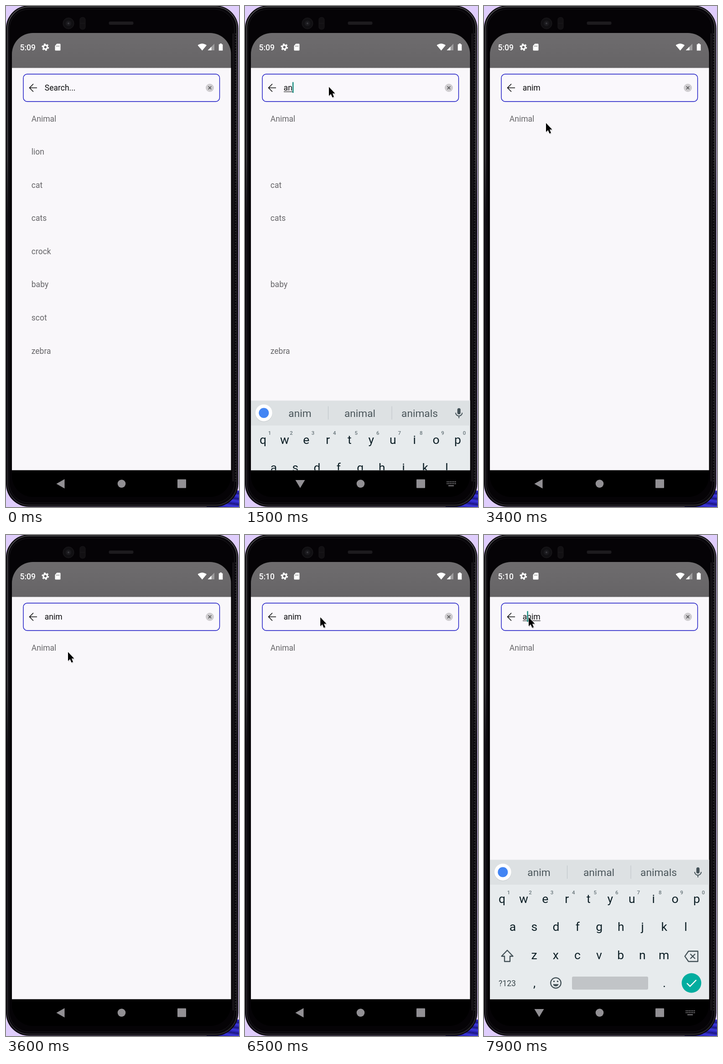
An HTML page that plays this animation: 511x1096 px, repeating every 8 s.

```html
<!DOCTYPE html>
<html lang="en">
<head>
<meta charset="utf-8">
<title>Search demo</title>
<style>
  html, body { margin: 0; width: 100%; height: 100%; overflow: hidden; background: #dfcdfc; }
  svg { display: block; width: 100%; height: 100%; }
  text { font-family: Roboto, sans-serif; font-size: 17.5px; white-space: pre; }
  .list { fill: #666568; }
  .mid { text-anchor: middle; }
  .key { font-size: 26.5px; fill: #0d1f26; }
  .hint { font-size: 11.5px; fill: #68757a; font-weight: 500; }
  .word { font-size: 22.7px; fill: #4b565b; }
  .line { fill: none; stroke: #435157; stroke-width: 2.3; stroke-linejoin: round; }
</style>
</head>
<body>
<svg viewBox="0 0 511 1096">
  <defs>
    <linearGradient id="rim" x2="0" y2="1">
      <stop offset="0" stop-color="#48474a"/>
      <stop offset=".3" stop-color="#4e4d50"/>
      <stop offset=".42" stop-color="#1d1b20"/>
      <stop offset="1" stop-color="#2d2b30"/>
    </linearGradient>
    <linearGradient id="bar" x2="0" y2="1">
      <stop offset="0" stop-color="#6e6c6e"/>
      <stop offset="1" stop-color="#666466"/>
    </linearGradient>
    <linearGradient id="blue" x2="0" y2="6" gradientUnits="userSpaceOnUse" spreadMethod="repeat" y1="0" x1="0" gradientTransform="rotate(8) scale(2)">
      <stop offset="0" stop-color="#18146f"/>
      <stop offset=".5" stop-color="#3c37e0"/>
      <stop offset="1" stop-color="#211b9c"/>
    </linearGradient>
    <clipPath id="screen"><rect x="13" y="59" width="480.5" height="1015" rx="46"/></clipPath>
    <clipPath id="app"><rect x="13" y="135" width="480.5" height="880.5"/></clipPath>
  </defs>

  <rect width="511" height="1096" fill="#dfcdfc"/>
  <rect x="440" y="1060" width="71" height="36" fill="url(#blue)"/>

  <!-- phone body -->
  <rect x="0" y="-1" width="509.5" height="1096.5" rx="50" fill="#08060a"/>
  <rect x="3.5" y="2" width="503" height="1090" rx="47" fill="none" stroke="url(#rim)" stroke-width="2"/>
  <rect x="7" y="7" width="494" height="1080" rx="44" fill="#050306" stroke="#1b191d"/>
  <path d="M498 60V1040" stroke="#2b292d" stroke-width="1.5"/>
  <path d="M503.5 60V1040" stroke="#242226" stroke-width="3" stroke-dasharray="3 3"/>
  <circle cx="137" cy="38" r="12" fill="#111013" stroke="#1d1b1e"/>
  <circle cx="137" cy="38" r="6" fill="#1b1a1e"/>
  <circle cx="137" cy="38" r="2" fill="#3a393e"/>
  <rect x="162" y="25" width="12" height="26" rx="5" fill="#121013" stroke="#1a181b"/>
  <path d="M163 38H173" stroke="#1d1b1e"/>
  <rect x="225.5" y="34" width="54" height="7" rx="3" fill="#1d1b1e"/>

  <g clip-path="url(#screen)">
    <rect x="13" y="59" width="481" height="1016"/>
    <rect x="13" y="59" width="481" height="77" fill="url(#bar)"/>
    <rect x="13" y="135.5" width="481" height="880" fill="#f9f7fa"/>
  </g>

  <!-- status bar -->
  <g fill="#fff">
    <text id="clock" x="30.5" y="96.5" font-weight="500"></text>
    <circle cx="86.3" cy="90" r="4.3" fill="none" stroke="#fff" stroke-width="3.2"/>
    <circle cx="86.3" cy="90" r="6.8" fill="none" stroke="#fff" stroke-width="2.4" stroke-dasharray="3.6 3.52"/>
    <path d="M111.5 82.5H118a1.5 1.5 0 0 1 1.5 1.5V96a1.5 1.5 0 0 1-1.5 1.5H109a1.5 1.5 0 0 1-1.5-1.5V87Z"/>
    <path d="M110.8 86.5v2.7M113.5 86.5v2.7M116.2 86.5v2.7" stroke="#777" stroke-width="1.2"/>
    <path d="M420.5 86Q430.3 78.5 440 86L430.3 97.5Z"/>
    <path d="M457 82.5V97H442.5Z" opacity=".35"/>
    <path d="M450.5 89V97H442.5Z"/>
    <path d="M469 82h4v1.7h2.3V97.5h-8.6V83.7H469Z"/>
  </g>

  <!-- search field -->
  <rect x="38" y="149" width="430.5" height="60" rx="8.5" fill="#faf8fc" stroke="#1715c4" stroke-width="1.4"/>
  <path d="M68 179H52.5M60 170.5L51.5 179L60 187.5" fill="none" stroke="#111" stroke-width="1.6"/>
  <circle cx="447" cy="179" r="9" fill="#cfcdd0"/>
  <path d="M443.7 175.7l6.6 6.6m0-6.6l-6.6 6.6" stroke="#505052" stroke-width="1.6"/>
  <text id="query" x="84.8" y="185" fill="#0c0c0e"></text>
  <rect id="underline" x="85" y="187" height="1.2" fill="#222"/>
  <rect id="caret" y="166.5" width="2.4" height="23.5" fill="#128a7d"/>

  <g id="list"></g>

  <!-- keyboard -->
  <g clip-path="url(#app)">
    <g id="keyboard">
      <rect x="13" y="710" width="481" height="2" fill="#eceaee"/>
      <rect x="13" y="711" width="481" height="305" fill="#e7ebed"/>
      <rect x="13" y="711" width="481" height="54" fill="#dde1e3"/>
      <circle cx="41.3" cy="738.5" r="18.8" fill="#c9ced1"/>
      <circle cx="41.3" cy="737.5" r="18.5" fill="#fff"/>
      <circle cx="41.3" cy="737.5" r="11" fill="#4285f4"/>
      <path d="M182.5 723V752M322 723V752" stroke="#bcc2c6"/>
      <rect x="465.7" y="727" width="7" height="13.5" rx="3.5" fill="#435157"/>
      <path class="line" d="M462 737a7.2 7.2 0 0 0 14.4 0M469.2 744.5V749" style="stroke-width:1.9"/>
      <g id="keys"></g>
      <path class="line" d="M51 908.5L63.5 921.5H57V933H45V921.5H38.5Z"/>
      <path class="line" d="M448.5 910.5H469V933H448.5L440.5 921.7Z"/>
      <path class="line" d="M452.5 916.5l10.5 10.5m0-10.5l-10.5 10.5"/>
      <text x="51" y="986.5" class="mid" style="fill:#3a474c">?123</text>
      <circle class="line" cx="157.5" cy="980" r="11.3"/>
      <circle cx="153.5" cy="976.5" r="1.8" fill="#435157"/>
      <circle cx="161.5" cy="976.5" r="1.8" fill="#435157"/>
      <path d="M151.5 982.5h12a6 5 0 0 1-12 0Z" fill="#435157"/>
      <rect x="193" y="966" width="167" height="28.5" rx="3" fill="#c1c4c7"/>
      <circle cx="455" cy="980" r="21.5" fill="#02ad9f"/>
      <path d="M445 980.5l6.8 6.8L465.5 973.5" fill="none" stroke="#fff" stroke-width="2.4"/>
    </g>
  </g>

  <!-- navigation bar -->
  <g fill="#929094">
    <path id="back" d="M128.5 1035V1055.5L110.5 1045.2Z"/>
    <path id="down" d="M110.5 1037H131.5L121 1054.5Z"/>
    <circle cx="253.5" cy="1045" r="8.8"/>
    <rect x="376" y="1035.5" width="19" height="19" rx="1"/>
    <g id="switcher" fill="none" stroke="#929094" stroke-width="1.8">
      <path d="M442.5 1041h20M442.5 1045h20" stroke-dasharray="2 1.6"/>
      <path d="M446 1049.5h12"/>
    </g>
  </g>

  <g id="pointer">
    <path d="M0 0V19.5L4.4 15.6L7.6 23L11 21.5L7.9 14.3H13.5Z" transform="translate(1 2)" fill="#000" opacity=".2"/>
    <path d="M0 0V19.5L4.4 15.6L7.6 23L11 21.5L7.9 14.3H13.5Z" stroke="#fff" stroke-width="1.4" paint-order="stroke"/>
  </g>
</svg>

<script>
const LOOP = 8000;
const $ = id => document.getElementById(id);
const show = (id, on) => $(id).setAttribute('visibility', on ? 'visible' : 'hidden');

function addText(parent, x, y, content, className) {
  const node = document.createElementNS('http://www.w3.org/2000/svg', 'text');
  node.setAttribute('x', x);
  node.setAttribute('y', y);
  node.setAttribute('class', className);
  node.textContent = content;
  parent.append(node);
  return node;
}

const rows = ['Animal', 'lion', 'cat', 'cats', 'crock', 'baby', 'scot', 'zebra']
  .map((word, i) => addText($('list'), 55.8, 252.7 + i * 72.55, word, 'list'));

const PITCH = 47.45;
[['qwertyuiop', 39.5, 805], ['asdfghjkl', 63, 866], ['zxcvbnm', 110, 928]].forEach(([letters, x, y]) =>
  [...letters].forEach((c, i) => addText($('keys'), x + i * PITCH, y, c, 'key mid')));
[...'1234567890'].forEach((c, i) => addText($('keys'), 54 + i * PITCH, 785.5, c, 'hint mid'));
addText($('keys'), 110.5, 989, ',', 'key mid');
addText($('keys'), 395.5, 989, '.', 'key mid');
[['anim', 120.5], ['animal', 252], ['animals', 383]].forEach(([word, x]) =>
  addText($('keys'), x, 746, word, 'word mid'));

// Timelines are lists of [ms, value...]
const typing = [[0, ''], [1200, 'a'], [1500, 'an'], [1700, 'ani'], [1900, 'anim']];
const filtering = [[0, ''], [1400, 'a'], [1600, 'an'], [1800, 'ani'], [2000, 'anim']];
const path = [
  [100, 330, 1110], [600, 184, 177], [2800, 184, 177], [3400, 136, 256],
  [4400, 136, 256], [5000, 182, 180], [6300, 182, 180], [7000, 98, 180], [LOOP, 98, 180]
];
const lift = [[0, 0], [1400, 0], [1600, 1], [2800, 1], [3000, 0], [7700, 0], [7900, 1], [LOOP, 1]];

const latest = (line, t) => line.filter(([at]) => at <= t).pop()[1];
const ease = p => p * p * (3 - 2 * p);

function tween(line, t) {
  const i = line.findIndex(([at]) => at > t);
  if (i < 1) return line[i < 0 ? line.length - 1 : 0].slice(1);
  const [from, to] = [line[i - 1], line[i]];
  const p = ease((t - from[0]) / (to[0] - from[0]));
  return from.slice(1).map((v, k) => v + (to[k + 1] - v) * p);
}

function widthOf(text) {
  const em = { a: .544, n: .552, i: .243, m: .876 };
  return [...text].reduce((sum, c) => sum + em[c] * 17.5, 0);
}

function draw(t) {
  const query = latest(typing, t);
  const filter = latest(filtering, t);
  const firstFocus = t >= 900 && t < 2900;
  const focused = firstFocus || t >= 7400;
  const keyboardNav = (t >= 1400 && t < 2900) || t >= 7600;
  const blinkFrom = firstFocus ? Math.max(900, typing.filter(([at]) => at <= t).pop()[0]) : 7400;

  $('clock').textContent = t < 4400 ? '5:09' : '5:10';
  $('query').textContent = query || 'Search...';
  $('underline').setAttribute('width', focused ? widthOf(query) : 0);
  $('caret').setAttribute('x', 84.9 + widthOf(firstFocus ? query : 'a'));
  show('caret', focused && (t - blinkFrom) % 1000 <= 510);
  rows.forEach(row => row.setAttribute('visibility',
    row.textContent.toLowerCase().includes(filter) ? 'visible' : 'hidden'));

  const [raised] = tween(lift, t);
  $('keyboard').setAttribute('transform', `translate(0 ${(1 - raised) * 310})`);
  show('back', !keyboardNav);
  show('down', keyboardNav);
  show('switcher', keyboardNav);

  $('pointer').setAttribute('transform', `translate(${tween(path, t).join(' ')})`);
}

const start = performance.now();
function tick() {
  draw((performance.now() - start) % LOOP);
  requestAnimationFrame(tick);
}
tick();
</script>
</body>
</html>
```
